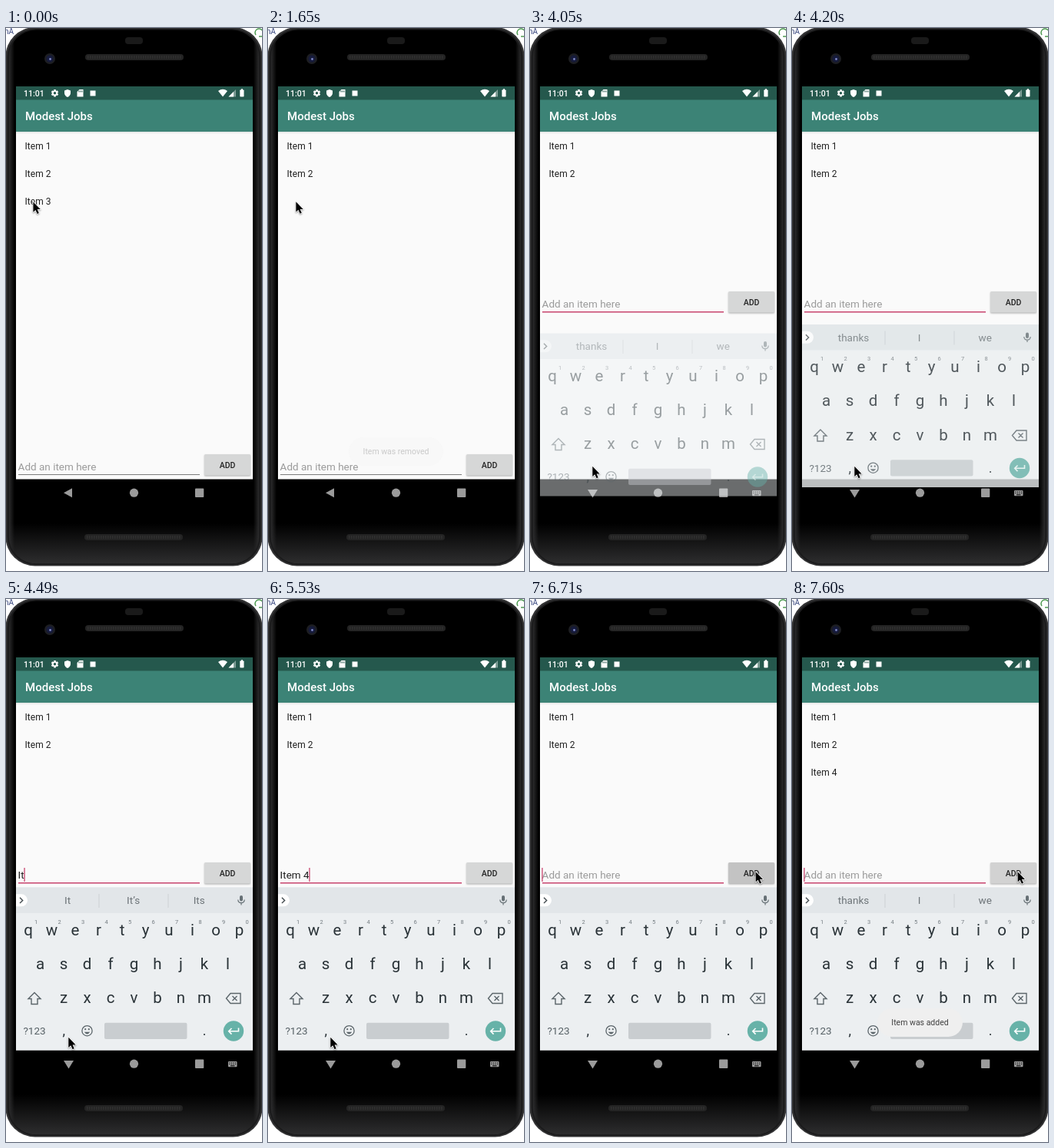
Animation, 333 px wide and 707 px high, one loop 8000 ms. Source, as an HTML page with a canvas:

```html
<!DOCTYPE html>
<html lang="en">
<head>
<meta charset="utf-8">
<title>Modest Jobs</title>
<style>
html, body { margin: 0; width: 100%; height: 100%; overflow: hidden; background: #fff; }
canvas { display: block; width: 333px; height: 707px; }
</style>
</head>
<body>
<canvas id="stage"></canvas>
<script>
const W = 333, H = 707, LOOP = 8000;
const canvas = document.getElementById('stage');
const dpr = window.devicePixelRatio || 1;
canvas.width = W * dpr;
canvas.height = H * dpr;
const c = canvas.getContext('2d');

// Value of the last step whose time has passed
const at = (t, steps) => steps.reduce((v, s) => t >= s[0] ? s[1] : v, steps[0][1]);

function box(x, y, w, h, fill, r = 0) {
  c.fillStyle = fill;
  c.beginPath();
  c.roundRect(x, y, w, h, r);
  c.fill();
}
function disc(x, y, r, fill) {
  c.fillStyle = fill;
  c.beginPath();
  c.arc(x, y, r, 0, Math.PI * 2);
  c.fill();
}
function path(d, fill, stroke, lw = 1) {
  const p = new Path2D(d);
  if (fill) { c.fillStyle = fill; c.fill(p); }
  if (stroke) { c.strokeStyle = stroke; c.lineWidth = lw; c.stroke(p); }
}
function text(s, x, y, size, fill, align = 'left', weight = 400) {
  c.font = `${weight} ${size}px Roboto, sans-serif`;
  c.textAlign = align;
  c.fillStyle = fill;
  c.fillText(s, x, y);
}
function gradient(x0, y0, x1, y1, ...stops) {
  const g = c.createLinearGradient(x0, y0, x1, y1);
  stops.forEach(([p, color]) => g.addColorStop(p, color));
  return g;
}
function faded(alpha, draw, dy = 0) {
  if (alpha <= 0) return;
  c.save();
  c.globalAlpha *= alpha;
  c.translate(0, dy);
  draw();
  c.restore();
}

function speaker(x, y) {
  box(x, y, 128, 8, '#242424', 4);
  for (let i = 3; i < 126; i += 3) box(x + i, y + 2, 1.5, 4, '#303030');
}

function phone() {
  box(0, 0, W, H, '#fff');
  text('nA', -2, 8, 10, '#33427c');
  path('M325 9A5 5 0 0 1 333 3M329 11H333', null, '#4d9a50', 1.5);
  box(-0.5, -1, 334, 701.5, '#333334', 38);
  box(1.5, 1, 330, 698, '#1c1c1d', 37);
  box(4, 2.5, 325, 695, gradient(4, 0, 329, 0,
    [0, '#2a2a2b'], [0.022, '#000'], [0.978, '#000'], [1, '#2a2a2b']), 35);
  box(4, 2.5, 325, 695, gradient(0, 645, 0, 698,
    [0, 'rgba(46,46,47,0)'], [1, 'rgba(46,46,47,1)']), 35);
  box(155, 12, 23, 9, '#1a1a1a', 4);
  disc(57, 40, 7, '#1d1e22');
  disc(57, 40, 4.5, '#161b3c');
  disc(57.5, 40.5, 1.4, '#7d86c4');
  speaker(103, 34);
  speaker(102, 659);
}

function statusBar() {
  box(13, 76, 308, 18, '#25584d');
  text('11:01', 23, 88.6, 10.5, '#fff', 'left', 500);
  for (let i = 0; i < 6; i++) {
    c.save();
    c.translate(63.5, 84.8);
    c.rotate(i * Math.PI / 3);
    box(-1.4, -4.7, 2.8, 3, '#fff');
    c.restore();
  }
  disc(63.5, 84.8, 3.4, '#fff');
  disc(63.5, 84.8, 1.7, '#25584d');
  path('M80 80L84 81.5V85Q83.5 88.5 80 90Q76.5 88.5 76 85V81.5Z', '#fff');
  path('M95.5 80H100.5V89.5H92.5V83Z', '#fff');
  for (let i = 0; i < 3; i++) box(94.4 + i * 2, 81.5, 1, 2, '#25584d');
  box(109.5, 81.5, 7, 7, '#fff');
  path('M276 82Q282 77.5 288 82L282 89.5Z', '#fff');
  path('M299 80V89.5H289.5Z', '#7d9c95');
  path('M296 83V89.5H289.5Z', '#fff');
  box(304.3, 80.5, 5.2, 9, '#fff', 0.7);
  box(305.8, 79.3, 2.2, 2, '#fff');
}

function appBar() {
  box(13, 135, 308, 3, gradient(0, 135, 0, 138, [0, '#e0e3e2'], [1, '#fafafa']));
  box(13, 93.5, 308, 41.5, '#3c8376');
  text('Modest Jobs', 25, 120.3, 15, '#fff', 'left', 500);
}

function list(t) {
  const row = (s, i) => text(s, 24.6, 158 + 36 * i, 12, '#202020');
  row('Item 1', 0);
  row('Item 2', 1);
  if (t < 1650) row('Item 3', 2);
  faded(at(t, [[0, 0], [6860, 0.4], [7010, 1]]), () => row('Item 4', 2));
}

function inputRow(t) {
  const up = t >= 3900;
  const typed = at(t, [[0, ''], [4490, 'It'], [4640, 'Item'], [5240, 'Item '], [5390, 'Item 4'], [6710, '']]);
  const focus = t >= 3600;
  const caret = t >= 4350 && !(t >= 7160 && t < 7600);
  faded(1, () => {
    text(typed || 'Add an item here', 15.6, 575.6, 13.5, typed ? '#212121' : '#9b9b9b');
    if (focus) box(16, 581, 236, 1.5, '#c8446e');
    else box(16, 581, 236, 1, '#7c7c7c');
    if (caret) box(15.3 + c.measureText(typed).width, 562, 1.3, 18, '#c8446e');

    c.save();
    c.shadowColor = 'rgba(0,0,0,.3)';
    c.shadowBlur = 2 * dpr;
    c.shadowOffsetY = dpr;
    box(258, 555, 60, 27.6, at(t, [[0, '#d6d7d7'], [6420, '#c3c3c3'], [6860, '#c9c9c9'], [7160, '#d2d2d2']]), 1.5);
    c.restore();
    text('ADD', 288, 572.8, 10.5, '#222', 'center', 500);
  }, up ? -212 : 0);
}

function suggestions(t) {
  const words = at(t, [
    [0, ['thanks', 'I', 'we']],
    [4490, ['It', 'It’s', 'Its']],
    [4640, ['Items', 'Item', 'Item’s']],
    [5240, []],
    [7010, ['thanks', 'I', 'we']]
  ]);
  words.forEach((w, i) => text(w, 80 + 85.6 * i, 397.3, 13.5, '#6d7478', 'center'));
  if (words.length) [120.5, 210.5].forEach(x => box(x, 384, 1, 18, '#cbd0d3'));
}

function keys() {
  const ink = '#293237', soft = '#5b656a';
  const row = (s, x, y) => [...s].forEach((k, i) => text(k, x + 30.5 * i, y, 20.5, ink, 'center'));
  row('qwertyuiop', 29, 437.8);
  row('asdfghjkl', 44.5, 481.8);
  row('zxcvbnm', 75, 526.3);
  [...'1234567890'].forEach((k, i) => text(k, 39 + 30.5 * i, 422.6, 7.5, '#737b80', 'center'));

  path('M37 512.5L45 520.5H41V527.5H33V520.5H29Z', null, soft, 1.4);
  path('M292 513.5H305V526.5H292L286.5 520ZM294.5 517L300.5 523M300.5 517L294.5 523', null, soft, 1.4);

  text('?123', 37, 567.3, 13.5, '#566065', 'center');
  text(',', 75.3, 568, 18, ink, 'center');
  text('.', 258, 568, 18, ink, 'center');
  c.strokeStyle = soft;
  c.lineWidth = 1.3;
  c.beginPath();
  c.arc(105.5, 562.2, 6.6, 0, Math.PI * 2);
  c.stroke();
  disc(103.2, 560.2, 1.1, soft);
  disc(107.8, 560.2, 1.1, soft);
  path('M101.8 563.8Q105.5 569.2 109.2 563.8Z', soft);
  box(128, 551.7, 107.5, 21.3, '#c9cdd0', 2);
  disc(296, 562.5, 13.2, '#67b2a8');
  path('M302.5 558.5V562.8H290M293.5 559L289.7 562.8L293.5 566.6', null, '#fff', 1.6);
}

function keyboard(t) {
  box(13, 375.5, 308, 212, '#eceff1');
  box(13, 375.5, 308, 33.5, '#e2e6e9');
  path('M13 384.3H20A8 8 0 0 1 20 400.3H13Z', '#fff');
  path('M18 388.8L21.7 392.4L18 396', null, '#454d51', 1.4);
  suggestions(t);
  box(304, 386, 4, 7.5, '#667075', 2);
  path('M301.8 391.5Q302 395.6 306 395.6Q310 395.6 310.2 391.5M306 395.6V398.5', null, '#667075', 1.2);
  keys();
}

function navBar(t) {
  const g = '#9b9b9b';
  if (t < 3900) path('M75 605.2L86 599.3V611.2Z', g);
  else {
    path('M75 601H88L81.5 611.6Z', g);
    box(289, 602, 11.5, 7.2, g, 1);
    for (let i = 0; i < 8; i++) box(290.4 + (i % 4) * 2.5, 603.3 + (i >> 2) * 2, 1.2, 1, '#000');
    box(292, 607.3, 5.5, 1, '#000');
  }
  disc(166.5, 605.2, 5.6, g);
  box(246, 599.6, 11.3, 11.3, g, 1);
}

function toast(s, alpha) {
  faded(alpha, () => {
    c.font = '400 10.5px Roboto, sans-serif';
    const w = c.measureText(s).width + 36.5;
    box(166.5 - w / 2, 533, w, 37, '#efefef', 18.5);
    text(s, 166.5, 555.3, 10.5, '#404040', 'center');
  });
}

function pointer(t) {
  const [x, y] = at(t, [
    [0, [34.8, 225.7]], [150, [35.8, 225.5]],
    [2400, [66, 420]], [2550, [108, 616]],
    [2850, [101, 603]], [3000, [87, 580]], [3150, [80.7, 570]],
    [5680, [112, 535]], [5830, [220, 405]], [5980, [307, 320]],
    [6120, [299, 344]], [6270, [293, 354.5]]
  ]);
  c.save();
  c.translate(x, y);
  c.lineJoin = 'round';
  c.shadowColor = 'rgba(0,0,0,.3)';
  c.shadowBlur = 2 * dpr;
  c.shadowOffsetY = dpr;
  const d = 'M.6 .8V14L3.6 11.2L5.9 16.2L8 15.3L5.9 10.4H10Z';
  path(d, '#fff', '#fff', 1.6);
  c.shadowColor = 'transparent';
  path(d, '#000');
  c.restore();
}

function draw(t) {
  c.setTransform(dpr, 0, 0, dpr, 0, 0);
  phone();
  box(13, 76, 308, 511.5, '#fafafa');
  statusBar();
  appBar();
  list(t);
  inputRow(t);
  navBar(t);
  faded(at(t, [[0, 0], [4050, 0.45], [4200, 0.8], [4350, 1]]),
    () => keyboard(t),
    at(t, [[0, 22], [4200, 10.5], [4350, 0]]));
  toast('Item was removed', at(t, [[0, 0], [1650, 0.25], [1800, 0.6], [1950, 0.9], [2100, 1], [3600, 0.6], [3750, 0.15], [3900, 0]]));
  toast('Item was added', at(t, [[0, 0], [6860, 0.2], [7010, 0.55], [7160, 0.85], [7300, 1]]));
  pointer(t);
}

const start = performance.now();
function tick() {
  draw((performance.now() - start) % LOOP);
  requestAnimationFrame(tick);
}
tick();
</script>
</body>
</html>
```
